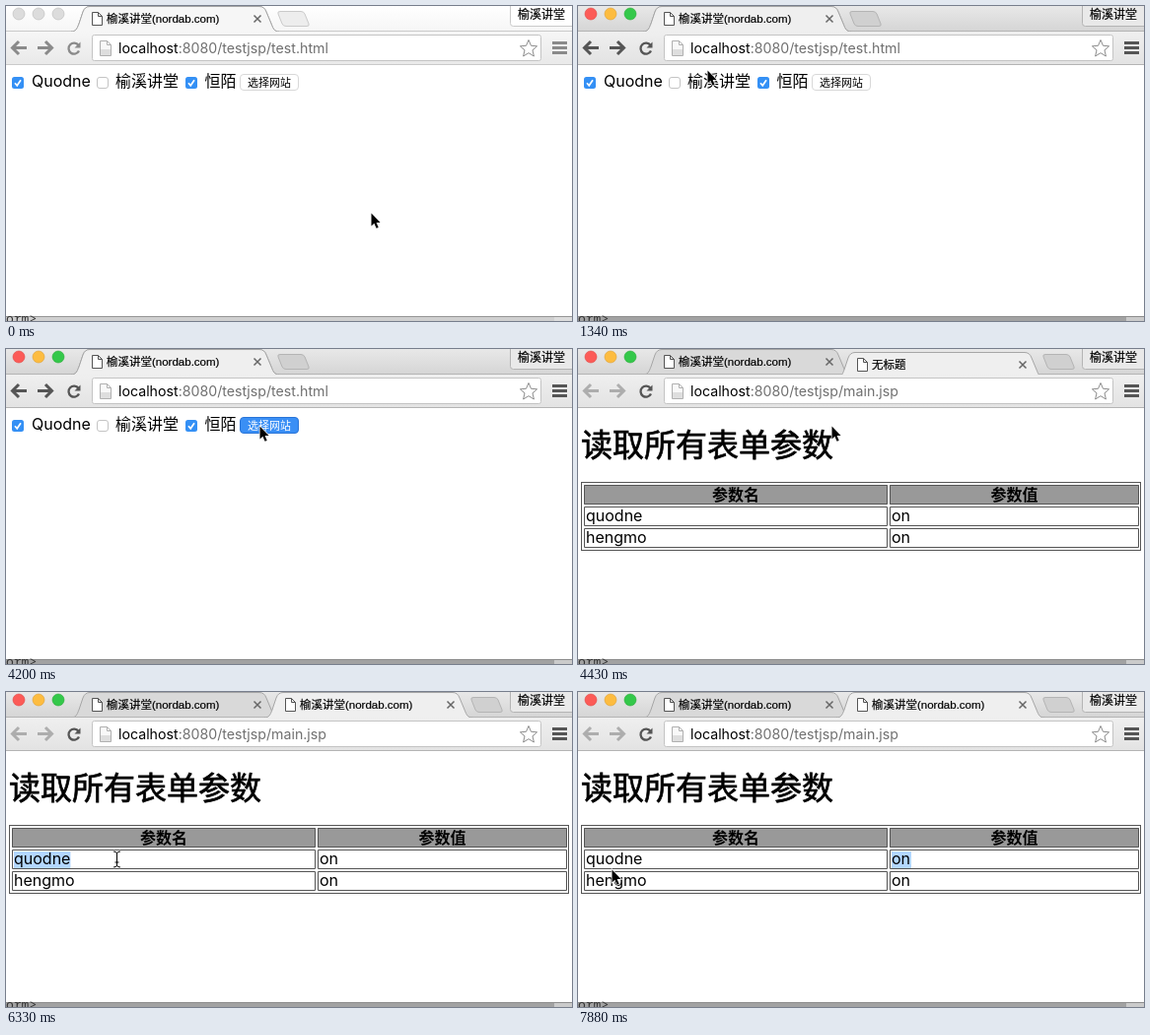
Animation, 574 px wide and 320 px high, one loop 8 s. Source, as an HTML page:

```html
<!DOCTYPE html>
<html lang="zh-CN">
<head>
<meta charset="utf-8">
<title>表单参数</title>
<style>
html, body { margin: 0; width: 100%; height: 100%; overflow: hidden; background: #fff; }
svg { display: block; width: 574px; height: 320px; --bar1: #e8e8e8; --bar2: #d4d4d4; --tab: #efefef; --tool: #e3e3e3; --edge: #b4b4b4; --plus: #d0d0d0; --user: #e9e9e9; --icon: #555; --desk: #a2a2a2; }
svg.idle { --bar1: #fff; --bar2: #f5f5f5; --tab: #f6f6f6; --tool: #e9e9e9; --edge: #cacaca; --plus: #ededed; --user: #fff; --icon: #8a8a8a; --desk: #d0d0d0; }
text { font: 16px Inter, "Noto Sans CJK SC", sans-serif; fill: #000; }
.title { font: 11.5px "Liberation Sans", "Noto Sans CJK SC", sans-serif; stroke: #000; stroke-width: .2; }
.mid { text-anchor: middle; }
.head { font-weight: bold; }
.line { fill: none; stroke: var(--edge); }
.icon { fill: none; stroke: var(--icon); stroke-width: 3; }
.cell { fill: none; stroke: #555; }
.sel { fill: #b3d7ff; }
.light { stroke-width: .6; }
.idle .light { fill: #dcdcdc; stroke: #bbb; }
</style>
</head>
<body>
<svg id="stage" viewBox="0 0 574 320">
  <defs>
    <linearGradient id="bar" x2="0" y2="1">
      <stop style="stop-color:var(--bar1)"/><stop offset="1" style="stop-color:var(--bar2)"/>
    </linearGradient>
    <linearGradient id="tool" x2="0" y2="1">
      <stop style="stop-color:var(--tab)"/><stop offset="1" style="stop-color:var(--tool)"/>
    </linearGradient>
    <path id="tab" d="M66 26C71 26 72 23 74 18L78 6Q80 .5 85 .5H257Q262 .5 264 6L269 18C271 23 272 26 277 26"/>
    <g id="tabIcons" fill="none">
      <path d="M87.5 6.5H93.5L97.5 10.5V19.5H87.5ZM93.5 6.5V10.5H97.5" fill="#fff" stroke="#555"/>
      <path d="M251.5 9.5L258.5 16.5M258.5 9.5L251.5 16.5" stroke="#666" stroke-width="1.5"/>
    </g>
    <rect id="box" x=".5" y=".5" width="11" height="11" rx="2.5" fill="#fff" stroke="#c4c4c4"/>
    <g id="ticked">
      <rect width="12" height="12" rx="2.5" fill="#3490f5"/>
      <path d="M3 6.3L5.2 8.8L9 3.2" fill="none" stroke="#fff" stroke-width="1.7"/>
    </g>
    <path id="beamShape" d="M-3.5 -8Q0 -8 0 -6V6Q0 8 -3.5 8M3.5 -8Q0 -8 0 -6M0 6Q0 8 3.5 8M-2 3H2"/>
  </defs>

  <!-- window frame -->
  <rect width="574" height="27" fill="url(#bar)"/>
  <circle class="light" cx="13" cy="8" r="6" fill="#fc5b57" stroke="#df4744"/>
  <circle class="light" cx="33" cy="8" r="6" fill="#fdbc40" stroke="#de9f34"/>
  <circle class="light" cx="53" cy="8" r="6" fill="#34c84a" stroke="#27aa35"/>
  <path id="plus" class="line" style="fill:var(--plus)" d="M278 5.5H299Q302 5.5 303 8L307 18Q308 20.5 305 20.5H284Q281 20.5 280 18L276 8Q275 5.5 278 5.5Z"/>
  <rect class="line" x="511.5" y="-4" width="70" height="24.5" rx="3" style="fill:var(--user)"/>
  <text class="title" x="519" y="13" style="font-size:12px">榆溪讲堂</text>
  <use href="#tab" fill="#d9d9d9" stroke="#a6a6a6"/>
  <path class="line" d="M0 25.5H574"/>
  <g id="front"><use href="#tab" style="fill:var(--tab)" stroke="#a6a6a6"/></g>
  <use href="#tabIcons"/>
  <text class="title" x="102" y="17">榆溪讲堂(nordab.com)</text>
  <g id="second">
    <use href="#tabIcons" x="196"/>
    <text class="title" id="title2" x="298" y="17"></text>
  </g>

  <!-- toolbar -->
  <rect y="26" width="574" height="33" fill="url(#tool)"/>
  <path class="line" d="M0 59.5H574"/>
  <g id="arrows" class="icon">
    <path d="M21 42.5H7M13 36L6.5 42.5L13 49"/>
    <path d="M32 42.5H46M40 36L46.5 42.5L40 49"/>
  </g>
  <path class="icon" style="stroke-width:2.3" d="M73.5 40A5.5 5.5 0 1 0 74 45.5"/>
  <path d="M75.5 36.5V42.5H69.5Z" style="fill:var(--icon)"/>
  <rect x="87.5" y="29.5" width="455" height="26" rx="2" fill="#fff" stroke="#c4c4c4"/>
  <path d="M95.5 35.5H102.5L106.5 39.5V50.5H95.5ZM102.5 35.5V39.5H106.5" fill="#f8f8f8" stroke="#b0b0b0"/>
  <path d="M96 44H106V50H96Z" fill="#dedede"/>
  <text x="114" y="48" style="font-size:14.2px">localhost<tspan id="path" fill="#707070"></tspan></text>
  <path d="M530 34.5L532.5 40.3L538.6 40.8L534 44.9L535.4 51L530 47.7L524.6 51L526 44.9L521.4 40.8L527.5 40.3Z" fill="#fff" stroke="#8c8c8c"/>
  <path class="icon" d="M554 37.5H569M554 42.5H569M554 47.5H569"/>

  <rect y="60" width="574" height="256" fill="#fff"/>

  <g id="form">
    <use href="#ticked" x="6" y="72"/>
    <text x="26" y="82">Quodne</text>
    <use href="#box" x="92" y="72"/>
    <text x="111" y="82">榆溪讲堂</text>
    <use href="#ticked" x="182" y="72"/>
    <text x="201.5" y="82">恒陌</text>
    <rect id="button" x="237.5" y="69.5" width="59" height="16" rx="3.5"/>
    <text id="buttonText" class="mid" x="267" y="82" style="font-size:11px">选择网站</text>
  </g>

  <g id="result">
    <text x="3" y="109" style="font-size:32px" stroke="#000" stroke-width=".7">读取所有表单参数</text>
    <rect class="cell" x="3.5" y="135.5" width="567" height="69"/>
    <path d="M6 138H314V158H6ZM316 138H569V158H316Z" fill="#999"/>
    <path class="cell" d="M6.5 138.5H313.5V157.5H6.5ZM316.5 138.5H568.5V157.5H316.5ZM6.5 160.5H313.5V179.5H6.5ZM316.5 160.5H568.5V179.5H316.5ZM6.5 182.5H313.5V201.5H6.5ZM316.5 182.5H568.5V201.5H316.5Z"/>
    <rect id="selName" class="sel" x="8" y="162" height="17"/>
    <rect id="selValue" class="sel" x="318" y="162" width="20" height="17"/>
    <text class="mid head" x="160" y="154">参数名</text>
    <text class="mid head" x="442.5" y="154">参数值</text>
    <text id="name" x="8" y="175">quodne</text><text x="318" y="175">on</text>
    <text x="8" y="197">hengmo</text><text x="318" y="197">on</text>
  </g>

  <!-- window behind -->
  <rect y="315" width="574" height="5" style="fill:var(--desk)"/>
  <path d="M556 316H574V320H556Z" fill="#e6e6e6" opacity=".6"/>
  <path d="M0 315.5H574" stroke="#888" opacity=".8"/>
  <text x="0" y="322" style="font:13px 'Noto Sans Mono',monospace;fill:#333">orm&gt;</text>

  <path id="arrow" d="M.5 .5V13.5L3.4 10.8L5.6 15.8L7.7 14.9L5.6 10H9.6Z" stroke="#fff" stroke-width="1.4" paint-order="stroke"/>
  <g id="beam" fill="none">
    <use href="#beamShape" stroke="#fff" stroke-width="2.4" opacity=".8"/>
    <use href="#beamShape" stroke="#000"/>
  </g>
</svg>
<script>
const LOOP = 8000, START = 500, STEP = 119.03;
const $ = id => document.getElementById(id);
const show = (id, on) => $(id).style.display = on ? '' : 'none';
const set = (id, attrs) => { for (const k in attrs) $(id).setAttribute(k, attrs[k]); };

// step, x, y, 1 for the text beam
const pointer = [
  [2, 370, 210, 0], [3, 376, 206, 0], [5, 262, 122, 0], [7, 131, 65, 0], [9, 62, 66, 0],
  [11, 32, 79, 1], [12, 36, 82, 1], [14, 110, 86, 1], [16, 210, 87, 1], [19, 210, 87, 1],
  [20, 227.5, 79, 1], [21, 240, 78, 0], [24, 257, 78, 0], [36, 257, 78, 0], [37, 252, 82, 0],
  [39, 150, 125, 0], [42, 17, 167, 1], [43, 2, 171, 0], [44, 4, 171, 0], [45, 10, 170, 1],
  [47, 45, 170, 1], [49, 112, 170, 1], [50, 113, 170, 1], [51, 120, 173, 0], [53, 220, 174, 0],
  [56, 327, 171, 1], [58, 327, 171, 1], [59, 290, 173, 0], [61, 80, 179, 0], [62, 34, 180, 0]
];

function pointerAt(step) {
  const i = pointer.findLastIndex(p => p[0] <= step);
  if (i < 0) return pointer[0].slice(1);
  const a = pointer[i], b = pointer[i + 1] || a;
  const u = b === a ? 0 : (step - a[0]) / (b[0] - a[0]);
  return [a[1] + (b[1] - a[1]) * u, a[2] + (b[2] - a[2]) * u, a[3]];
}

function draw(now) {
  const step = Math.floor((now % LOOP - START) / STEP + .06);
  const sent = step >= 33, pressed = step >= 31;
  const dx = sent ? 196 : 0, dy = step === 33 ? 3 : 0;
  $('stage').classList.toggle('idle', step < 0);

  set('front', { transform: `translate(${dx} ${dy})` });
  set('plus', { transform: `translate(${dx})` });
  set('second', { transform: `translate(0 ${dy})` });
  show('second', sent);
  show('form', !sent);
  show('result', sent);
  $('title2').textContent = step < 34 ? '无标题' : '榆溪讲堂(nordab.com)';
  $('path').textContent = ':8080/testjsp/' + (sent ? 'main.jsp' : 'test.html');
  set('arrows', { opacity: sent ? .4 : 1 });
  set('button', pressed ? { fill: '#3a8ff5', stroke: '#2a75d8' } : { fill: '#fff', stroke: '#d8d8d8' });
  $('buttonText').style.fill = pressed ? '#fff' : '#000';

  const [x, y, beam] = pointerAt(step);
  show('arrow', !beam);
  show('beam', beam);
  // the beam's stem sits on half pixels
  const left = beam ? Math.floor(x) + .5 : Math.round(x);
  set(beam ? 'beam' : 'arrow', { transform: `translate(${left} ${Math.round(y)})` });

  const dragged = step >= 45 && step < 56;
  const width = sent ? $('name').getComputedTextLength() : 0;
  const letter = width / 6;
  const reach = Math.min(width, Math.round((x - 8) / letter) * letter);
  set('selName', { width: dragged ? (step >= 49 ? width : Math.max(0, reach)) : 0 });
  show('selValue', step >= 58);
}

const begin = performance.now();
(function tick() {
  draw(performance.now() - begin);
  requestAnimationFrame(tick);
})();
</script>
</body>
</html>
```
